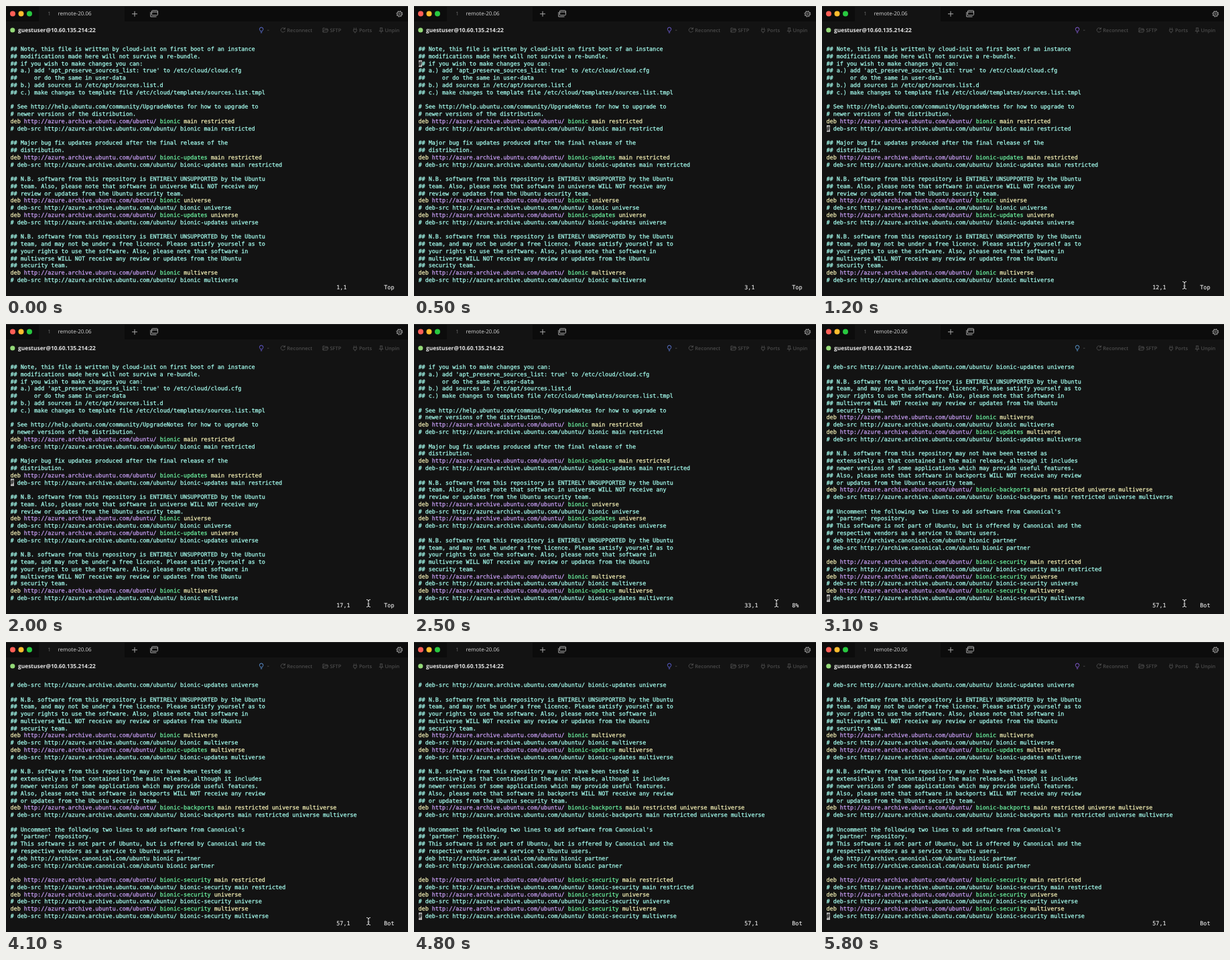
An HTML page that plays this animation: 600x433 px, repeating every 5900 ms.

```html
<!DOCTYPE html>
<html lang="en">
<head>
<meta charset="utf-8">
<title>Terminal</title>
<style>
  html, body { margin: 0; width: 100%; height: 100%; overflow: hidden; background: #131313; }
  #stage { position: relative; width: 600px; height: 433px; overflow: hidden; text-rendering: geometricPrecision; }
  svg { position: absolute; left: 0; top: 0; font: 8px "Open Sans", sans-serif; }
  pre { margin: 0; font: 8.43px/10.78px "DejaVu Sans Mono", monospace; color: #a6fff0; -webkit-text-stroke: .25px; }
  #view { position: absolute; left: 6.5px; top: 59px; width: 590px; height: 355.8px; overflow: hidden; }
  #ruler { position: absolute; left: 6.5px; top: 414.6px; color: #eee; -webkit-text-stroke: .1px; }
  #block { position: absolute; left: 0; top: 0; width: 5.1px; height: 10.8px; background: #b4b4b4; color: #222; }
  .deb { color: #f5f1b6; }
  .url { color: #c9a0f7; }
  .suite { color: #6df5a2; }
</style>
</head>
<body>
<div id="stage">
  <svg width="600" height="433" fill="none">
    <rect width="600" height="23" fill="#0c0c0c"/>
    <rect x="49" width="128" height="23" fill="#131313"/>
    <path d="M0 .5H600" stroke="#292929"/>
    <circle cx="10" cy="11.4" r="4" fill="#ff5f57"/>
    <circle cx="22.5" cy="11.4" r="4" fill="#febc2e"/>
    <circle cx="35" cy="11.4" r="4" fill="#28c840"/>
    <text x="62.5" y="14.3" fill="#777" font-size="7.5">1</text>
    <text x="77.5" y="14.3" fill="#d5d5d5">remote-20.06</text>
    <g stroke="#aaa">
      <path d="M188 11.8h8M192 7.8v8"/>
      <rect x="217.5" y="6.8" width="9" height="7" rx="1"/>
      <path d="M217.5 9h9M215.8 9v7h8.7"/>
      <circle cx="587.3" cy="11.8" r="3.5"/>
      <circle cx="587.3" cy="11.8" r="4.4" stroke-dasharray="1.7 1.755"/>
      <circle cx="587.3" cy="11.8" r="1.3" stroke-width=".8"/>
    </g>
    <circle cx="9.8" cy="36" r="3.6" fill="#94d978"/>
    <text x="18" y="39" fill="#e4e4e4" font-size="8.4" font-weight="700">guestuser@10.60.135.214:22</text>
    <g id="bulb">
      <path d="M379.9 37.8c0-1-1.5-1.6-1.5-3.2a2.7 2.7 0 0 1 5.4 0c0 1.6-1.5 2.2-1.5 3.2zM380 39.8h2.2"/>
    </g>
    <path d="M390 36.2h2.5" stroke="#444"/>
    <g stroke="#4a4a4a">
      <path d="M416 34a3.2 3.2 0 1 0 .4 3M416.4 32v2.5h-2.5"/>
      <path d="M473 39v-6h2.5l1 1h3.5v1.5M473 39l1.5-3.2h6.5l-1.5 3.2z"/>
      <path d="M519.5 32.5v2M522.5 32.5v2M518.5 35h5v1.5a2.5 2.5 0 0 1-5 0zM521 39v1.5"/>
      <path d="M558 32.8h4M558.7 33v3l-1.5 1.5h5.6l-1.5-1.5v-3M560 37.5v3"/>
    </g>
    <g fill="#4a4a4a" font-size="7.5" font-weight="600">
      <text x="419.3" y="38.6">Reconnect</text>
      <text x="483.5" y="38.6">SFTP</text>
      <text x="527" y="38.6">Ports</text>
      <text x="565.5" y="38.6">Unpin</text>
    </g>
  </svg>
  <div id="view"><pre id="file"></pre><pre id="block">#</pre></div>
  <pre id="ruler"></pre>
  <svg width="600" height="433" fill="none">
    <path id="pointer" d="M-3-5.5q3 0 3 2q0-2 3-2M0-4V4M-3 5.5q3 0 3-2q0 2 3 2M-1.5 1h3" stroke="#ddd"/>
  </svg>
</div>
<script>
const LOOP = 5900, ROW = 10.78, ROWS = 33;
const $ = id => document.getElementById(id);

// A package line followed by its commented source line
const repo = (suite, parts) => {
  const rest = `http://azure.archive.ubuntu.com/ubuntu/ ${suite} ${parts}`;
  return `deb ${rest}\n# deb-src ${rest}`;
};

const lines = `## Note, this file is written by cloud-init on first boot of an instance
## modifications made here will not survive a re-bundle.
## if you wish to make changes you can:
## a.) add 'apt_preserve_sources_list: true' to /etc/cloud/cloud.cfg
##     or do the same in user-data
## b.) add sources in /etc/apt/sources.list.d
## c.) make changes to template file /etc/cloud/templates/sources.list.tmpl

# See http://help.ubuntu.com/community/UpgradeNotes for how to upgrade to
# newer versions of the distribution.
${repo('bionic', 'main restricted')}

## Major bug fix updates produced after the final release of the
## distribution.
${repo('bionic-updates', 'main restricted')}

## N.B. software from this repository is ENTIRELY UNSUPPORTED by the Ubuntu
## team. Also, please note that software in universe WILL NOT receive any
## review or updates from the Ubuntu security team.
${repo('bionic', 'universe')}
${repo('bionic-updates', 'universe')}

## N.B. software from this repository is ENTIRELY UNSUPPORTED by the Ubuntu
## team, and may not be under a free licence. Please satisfy yourself as to
## your rights to use the software. Also, please note that software in
## multiverse WILL NOT receive any review or updates from the Ubuntu
## security team.
${repo('bionic', 'multiverse')}
${repo('bionic-updates', 'multiverse')}

## N.B. software from this repository may not have been tested as
## extensively as that contained in the main release, although it includes
## newer versions of some applications which may provide useful features.
## Also, please note that software in backports WILL NOT receive any review
## or updates from the Ubuntu security team.
${repo('bionic-backports', 'main restricted universe multiverse')}

## Uncomment the following two lines to add software from Canonical's
## 'partner' repository.
## This software is not part of Ubuntu, but is offered by Canonical and the
## respective vendors as a service to Ubuntu users.
# deb http://archive.canonical.com/ubuntu bionic partner
# deb-src http://archive.canonical.com/ubuntu bionic partner

${repo('bionic-security', 'main restricted')}
${repo('bionic-security', 'universe')}
${repo('bionic-security', 'multiverse')}`.split('\n');

const markup = lines.map(s => s.replace(/^deb (\S+) (\S+) (.*)/,
  '<span class="deb">deb <span class="url">$1</span> <span class="suite">$2</span> $3</span>'));

// [time, line] stops of the text cursor
const stops = [[0, 1], [300, 1], [1200, 12], [2000, 17], [2800, 47], [3100, 57], [LOOP, 57]];

function lineAt(t) {
  const i = stops.findIndex(s => s[0] > t);
  const [t0, a] = stops[i - 1], [t1, b] = stops[i];
  return Math.floor(a + (b - a) * (t - t0) / (t1 - t0) + 1e-6);
}

let drawnTop = -1;

function draw(now) {
  const t = Math.floor(now % LOOP / 100) * 100;
  const line = lineAt(t);
  const top = Math.max(0, line - ROWS), maxTop = lines.length - ROWS;
  const settled = t >= 3100;

  if (top !== drawnTop) {
    // A leading blank line would be dropped by the parser without the extra break
    $('file').innerHTML = markup.slice(top, top + ROWS).join('\n');
    drawnTop = top;
  }
  $('block').style.top = (line - 1 - top) * ROW + 'px';
  const lit = settled ? Math.floor((t - 3100) / 600) % 2 === 0 : t > 300 && !top;
  $('block').style.visibility = lit ? 'visible' : 'hidden';
  $('block').textContent = (lines[line - 1] || ' ')[0];

  // The ruler trails the cursor while the view scrolls
  const shown = settled ? line : line - Math.min(5, top);
  const place = !top ? 'Top' : top === maxTop ? 'Bot' : Math.floor(100 * top / maxTop) + '%';
  $('ruler').textContent = ' '.repeat(96) + `${shown},1`.padEnd(14) + place;

  const enter = Math.min(1, Math.max(0, (t - 800) / 300));
  $('pointer').setAttribute('transform', `translate(541 ${439 - 22 * enter})`);
  $('pointer').setAttribute('visibility', t < 4500 ? 'visible' : 'hidden');

  const hue = 232 + 28 * Math.cos((t - 1200) / 4600 * 2 * Math.PI);
  $('bulb').setAttribute('stroke', `hsl(${hue} 65% 62%)`);
}

const start = performance.now();
function tick() {
  draw(performance.now() - start);
  requestAnimationFrame(tick);
}
tick();
</script>
</body>
</html>
```
